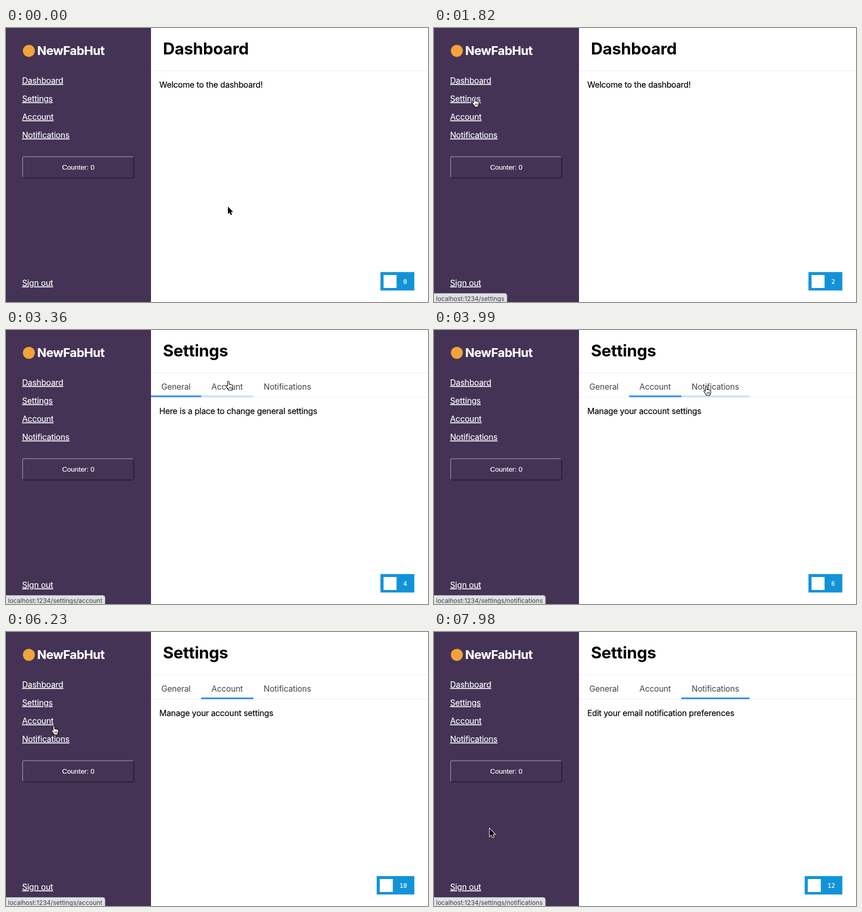
Animation, 812 px wide and 528 px high, one loop 8000 ms. Source, as an HTML page:

```html
<!DOCTYPE html>
<html lang="en">
<head>
<meta charset="utf-8">
<title>Dashboard demo</title>
<style>
html, body { margin: 0; width: 100%; height: 100%; overflow: hidden; background: #fff; }
svg { display: block; }
text { font: 15.6px Inter, "Open Sans", sans-serif; letter-spacing: -.14px; white-space: pre; stroke-width: .2px; }
.side text { fill: #fff; stroke: #fff; }
#links text { text-decoration: underline 1px; text-underline-offset: 2px; }
text.brand { font-size: 23.4px; font-weight: 700; letter-spacing: -.45px; }
text.button { font: 13.33px "Liberation Sans", Arial, sans-serif; letter-spacing: 0; }
#title { font-size: 31.4px; font-weight: 700; letter-spacing: -.25px; }
#body { stroke: #000; }
#tabs text { fill: #444; }
#count { font: 12px "DejaVu Sans Mono", monospace; letter-spacing: 0; fill: #fff; stroke: #fff; }
#url { font-size: 12px; letter-spacing: 0; fill: #3f4145; }
</style>
</head>
<body>
<svg width="812" height="528" viewBox="0 0 812 528">
  <rect width="812" height="528" fill="#fff"/>
  <g class="side">
    <rect width="279" height="528" fill="#443355"/>
    <circle cx="44" cy="44" r="11.5" fill="#f2a33a"/>
    <text class="brand" x="60" y="52">NewFabHut</text>
    <g id="links"></g>
    <g fill="none" stroke-width="2">
      <path d="M32 287V251a3 3 0 0 1 3-3H244" stroke="#7c7280"/>
      <path d="M246 250V286a3 3 0 0 1-3 3H34" stroke="#2a2033"/>
    </g>
    <text class="button" x="139" y="272.5" text-anchor="middle">Counter: 0</text>
  </g>

  <text id="title" x="302" y="51"></text>
  <rect x="279" y="82" width="533" height="1" fill="#ececec"/>
  <g id="tabs">
    <rect x="279" y="129" width="533" height="1" fill="#ececec"/>
    <rect id="hoverBar" y="126.3" height="3" fill="#c9dffa"/>
    <rect id="activeBar" y="126.3" height="3" fill="#2886ec"/>
  </g>
  <text id="body" x="295"></text>

  <rect id="badge" y="470.3" height="35.5" fill="#1293d8"/>
  <rect id="mark" y="476" width="25" height="25" fill="#fff"/>
  <text id="count" x="771.8" y="492.8" text-anchor="end"></text>

  <g id="status">
    <path id="bubble" fill="#dfe1e5" stroke="#b4b5ba"/>
    <text id="url" x="4" y="526"></text>
  </g>

  <g id="pointer">
    <circle id="ring" r="31.5" fill="none" stroke="#666" stroke-opacity=".7" stroke-width="2"/>
    <path id="arrow" d="M0 0V14.5L3.3 11.4 5.6 16.5 7.9 15.5 5.7 10.5H10Z" stroke="#fff" stroke-width="2" paint-order="stroke"/>
    <g id="hand" stroke="#000" stroke-width="1.1" stroke-linejoin="round">
      <path fill="#fff" d="M-1.6 9V1a1.5 1.5 0 0 1 3 0V6Q2.9 4.8 4 6.4 5.4 5.4 6.4 7 8.4 6.6 8.6 8.6V11.5Q8.5 13.5 7 15.3V17H0V15.6Q-2.4 12.8-4.5 9.5-5.2 7.6-3.6 7.7-2.6 7.8-1.6 9Z"/>
      <path d="M1.7 10.5V14M3.9 10.5V14M6 10.5V14" stroke-width=".9"/>
    </g>
  </g>
</svg>
<script>
const LOOP = 8000, STEP = 70, PRESS = 140;
const $ = id => document.getElementById(id);
const set = (id, attrs) => { for (const k in attrs) $(id).setAttribute(k, attrs[k]); };
const show = (id, on) => set(id, { visibility: on ? "visible" : "hidden" });

function addText(parent, label, x, y) {
  const el = document.createElementNS("http://www.w3.org/2000/svg", "text");
  el.textContent = label;
  el.setAttribute("x", x);
  el.setAttribute("y", y);
  $(parent).append(el);
  return el.getBBox();
}

const linkBoxes = ["Dashboard", "Settings", "Account", "Notifications"]
  .map((label, i) => addText("links", label, 31, 107 + 35 * i));
linkBoxes.push(addText("links", "Sign out", 31, 497));

const tabs = [
  { label: "General", url: "settings", text: "Here is a place to change general settings" },
  { label: "Account", url: "settings/account", text: "Manage your account settings" },
  { label: "Notifications", url: "settings/notifications", text: "Edit your email notification preferences" }
];
let edge = 279;
for (const tab of tabs) {
  tab.x = edge;
  tab.width = addText("tabs", tab.label, edge + 19.8, 115).width + 40;
  edge += tab.width;
}

// Pointer journeys; each may bend towards "via" and end in a click on a link.
const start = { x: 427, y: 344 };
const moves = [
  { from: 0, to: 210, x: 210, y: 120 },
  { from: 280, to: 910, x: 80, y: 102, click: 1120, url: "dashboard" },
  { from: 1400, to: 1820, x: 78, y: 135, click: 2100, url: "settings" },
  { from: 2590, to: 3360, x: 428, y: 99, via: { x: 79, y: 226 }, click: 3640, url: "settings/account" },
  { from: 3780, to: 3990, x: 524, y: 109, click: 4410, url: "settings/notifications" },
  { from: 4690, to: 5180, x: 78, y: 176, via: { x: 268, y: 281 }, click: 5810, url: "settings/account" },
  { from: 6160, to: 6300, x: 103, y: 208, via: { x: 94, y: 170 }, click: 7070, url: "settings/notifications" },
  { from: 7490, to: 7980, x: 107, y: 379 }
];

const ease = k => k * k * k * (10 - 15 * k + 6 * k * k);
const bend = (a, b, c, k) => (1 - k) ** 2 * a + 2 * k * (1 - k) * b + k * k * c;

function pointerAt(t) {
  let p = start;
  for (const m of moves.filter(m => m.from <= t)) {
    const k = ease(Math.min(1, (t - m.from) / (m.to - m.from)));
    const via = m.via || { x: (p.x + m.x) / 2, y: (p.y + m.y) / 2 };
    p = { x: bend(p.x, via.x, m.x, k), y: bend(p.y, via.y, m.y, k) };
  }
  return p;
}

function drawBar(id, tab) {
  show(id, tab);
  if (tab) set(id, { x: tab.x, width: tab.width });
}

function draw(t) {
  const { x, y } = pointerAt(t);
  const clicks = moves.filter(m => m.click <= t);
  const page = clicks.at(-1)?.url;
  const tab = tabs.find(tab => tab.url === page);

  $("title").textContent = tab ? "Settings" : "Dashboard";
  $("body").textContent = tab ? tab.text : "Welcome to the dashboard!";
  set("body", { y: tab ? 162 : 115 });
  set("tabs", { display: tab ? "inline" : "none" });

  const hovered = tab && y > 83 && y < 130 && tabs.find(o => x >= o.x && x < o.x + o.width);
  drawBar("activeBar", tab);
  drawBar("hoverBar", hovered);

  const count = String(2 * clicks.length);
  const left = 727.7 - 7.2 * count.length;
  $("count").textContent = count;
  set("badge", { x: left, width: 785.7 - left });
  set("mark", { x: left + 6 });

  const url = moves.filter(m => m.url && m.to <= t).at(-1)?.url;
  show("status", url);
  $("url").textContent = "localhost:1234/" + url;
  const w = $("url").getComputedTextLength() + 9;
  set("bubble", { d: `M-2 511.5H${w - 4}a4 4 0 0 1 4 4V530H-2Z` });

  const overLink = linkBoxes.some(b =>
    x >= b.x && x <= b.x + b.width + 2 && y >= b.y && y <= b.y + b.height + 2);
  const hand = overLink || hovered;
  set("pointer", { transform: `translate(${x} ${y})` });
  show("hand", hand);
  show("arrow", !hand);
  show("ring", moves.some(m => t >= m.click - PRESS && t < m.click));
}

function frame() {
  const t = performance.now() % LOOP;
  draw(Math.floor(t / STEP) * STEP);
  requestAnimationFrame(frame);
}
frame();
</script>
</body>
</html>
```
